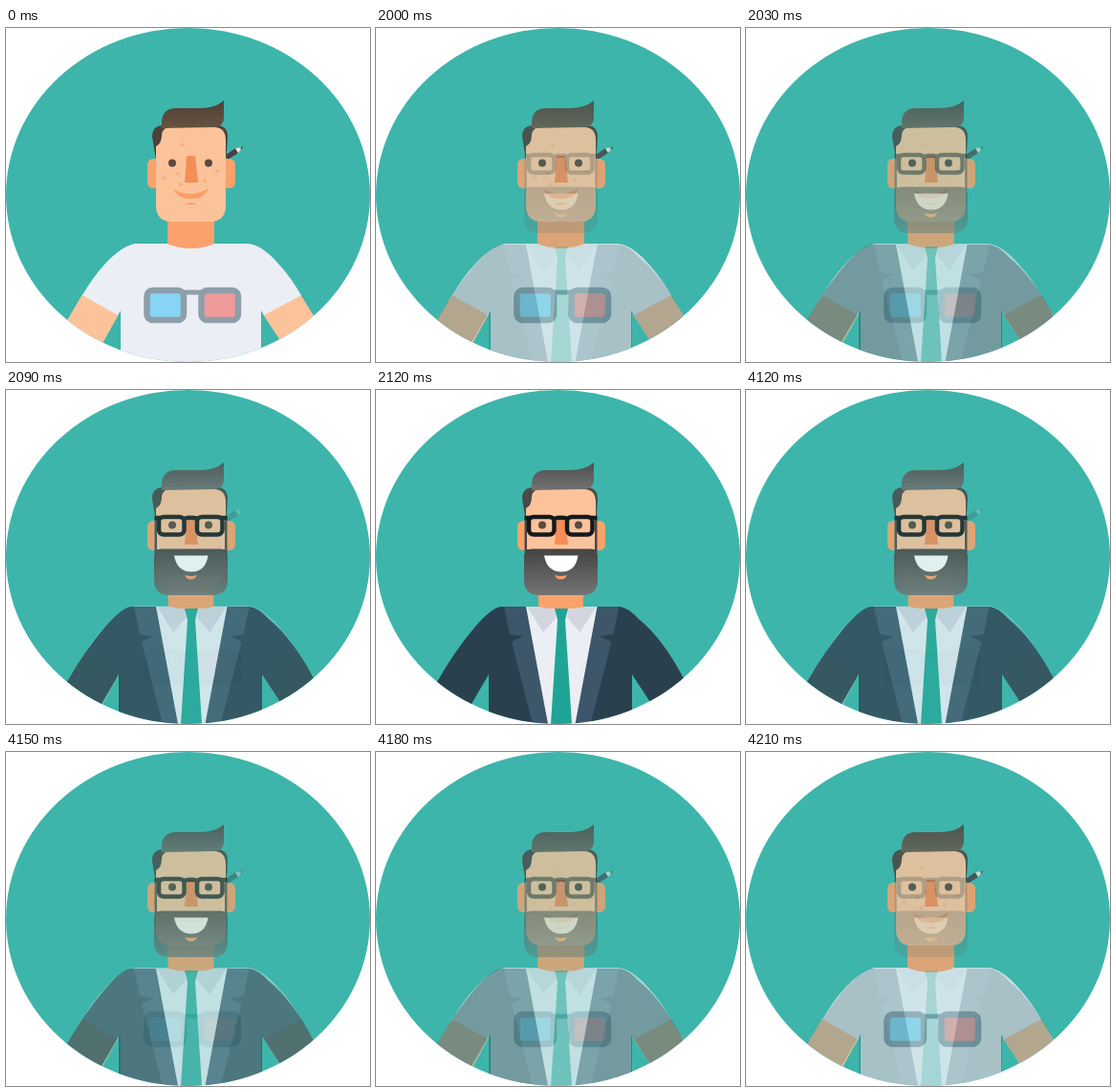
These frames come from a looping animation (381x350 px, 4.24 s). An HTML page:

```html
<!DOCTYPE html>
<html lang="en">
<head>
<meta charset="utf-8">
<title>Two looks</title>
<style>
  html, body { margin: 0; width: 100%; height: 100%; overflow: hidden; background: #fff; }
  svg { display: block; width: 381px; height: 350px; }
  #formal { opacity: 0; }
</style>
</head>
<body>
<svg viewBox="0 0 381 350">
  <defs>
    <clipPath id="stage"><ellipse cx="190.5" cy="175" rx="190.5" ry="175"/></clipPath>
    <linearGradient id="brown" x2="0" y2="1"><stop stop-color="#4f4038"/><stop offset="1" stop-color="#66533f"/></linearGradient>
    <linearGradient id="grey" x2="0" y2="1"><stop stop-color="#4f4f4f"/><stop offset="1" stop-color="#727272"/></linearGradient>
    <linearGradient id="beard" x2="0" y2="1"><stop stop-color="#434343"/><stop offset="1" stop-color="#747474"/></linearGradient>

    <path id="quiff" d="M163 105V98Q164 84 178 84H203Q219 84 228 76V93Q228 104 217 104Z"/>
    <path id="sides" d="M153 114Q153 102 165 102H220Q232 102 232 114L230.5 138H157Z"/>
    <g id="head">
      <rect x="148" y="137" width="16" height="31" rx="6" fill="#fba26c"/>
      <rect x="224" y="137" width="16" height="31" rx="6" fill="#fba26c"/>
      <path d="M157 124Q163 121 163 112Q164 104 172 104H218Q230 104 230 118V186Q230 203 213 203H174Q157 203 157 186Z" fill="#fcc39b"/>
      <path d="M189 134H198L201 162H187Z" fill="#f58d57"/>
      <g fill="#5b4a41"><circle cx="174" cy="141.5" r="4"/><circle cx="212" cy="141.5" r="4"/></g>
    </g>
  </defs>

  <g clip-path="url(#stage)">
    <rect width="381" height="350" fill="#3db5ab"/>

    <g id="casual">
      <path d="M80 279L118 300L98 336L50 330ZM308 279L269 300L290 332L340 330Z" fill="#fcc39b"/>
      <path d="M135 226H253Q268 227 286 248Q298 261 309 280L270 301L267 296V350H120V296L117 301L80 280Q91 261 103 248Q120 229 135 226Z" fill="#ebeef4"/>
      <path d="M169 190H218V226Q207 231 193.500 231T169 226Z" fill="#fba26c"/>
      <g stroke="#8e9eaa" stroke-width="6.500">
        <path d="M184 277H206" fill="none" stroke-width="5"/>
        <rect x="147.500" y="275" width="38.500" height="31" rx="6" fill="#86d5f5"/>
        <rect x="204.500" y="275" width="38.500" height="31" rx="6" fill="#ef9a98"/>
      </g>
      <use href="#sides" fill="#4e403a"/>
      <path d="M230 133L240 126L243 131L232 138Z" fill="#4a4045"/>
      <path d="M240 126L248 125L243 131Z" fill="#f2dfcd"/>
      <path d="M245.500 125.300L248.500 124.500L246 128Z" fill="#443c40"/>
      <use href="#head"/>
      <use href="#quiff" fill="url(#brown)"/>
      <g fill="#faae7b">
        <circle cx="184.500" cy="122.500" r="2"/><circle cx="166" cy="157.500" r="2"/>
        <circle cx="179.500" cy="152.500" r="1.700"/><circle cx="208" cy="160" r="2"/>
        <circle cx="183" cy="164" r="2"/><circle cx="221" cy="150" r="1.700"/>
      </g>
      <path d="M175 169Q193.500 179 212 168Q208 179 194 179T175 169ZM187 185Q194 181 200 185Z" fill="#fa9e68"/>
    </g>

    <g id="formal">
      <path d="M131 227H255Q264 228 275 240Q300 260 323 304L340 350H302L268 298V350H118V298L90 346L40 340L65 304Q82 274 103 249Q121 228 131 227Z" fill="#2b404e"/>
      <path d="M156 227H232L210 350H179Z" fill="#ebeef4"/>
      <path d="M170 195H217V229H170Z" fill="#fba26c"/>
      <g id="lapel">
        <path d="M134 227H157L180 350H164L142 264L154 258L140 256Z" fill="#3d566a"/>
        <path d="M158 227H170L188 230V239L175 254Z" fill="#d3d6e0"/>
      </g>
      <use href="#lapel" transform="matrix(-1 0 0 1 388.500 0)"/>
      <path d="M187 229H201L198 241L205 350H183L190 241Z" fill="#1fa596"/>
      <use href="#sides" fill="#4a4a4a"/>
      <use href="#head"/>
      <use href="#quiff" fill="url(#grey)"/>
      <path d="M155.500 135H158V167H229V135H231.500V170H155.500Z" fill="#484848"/>
      <path d="M155 173Q156 166.500 163 166.500H225Q231 166.500 232 173V199Q232 215 216 215H171Q155 215 155 199Z" fill="url(#beard)"/>
      <path d="M176 173.500H211.500Q209 190.500 194 190.500T176 173.500Z" fill="#fff"/>
      <path d="M187 194Q193.500 196 200 194Q198 198.500 193.500 198.500T187 194Z" fill="#fa9e68"/>
      <g fill="none" stroke="#15191b" stroke-width="4.500">
        <rect x="160" y="133" width="26.500" height="18.500" rx="5"/>
        <rect x="200" y="133" width="26.500" height="18.500" rx="5"/>
        <path d="M186 135Q193 132.500 201 135M155.500 134H162M225 134H231.500"/>
      </g>
    </g>
  </g>
</svg>
<script>
  const LOOP = 4240;
  // [time in ms, share of the formal look]
  const steps = [
    [0, 0], [2000, .2], [2030, .4], [2060, .6], [2090, .8],
    [2120, 1], [4120, .8], [4150, .6], [4180, .4], [4210, .2], [LOOP, .2]
  ];

  function fade(id, opacityOf) {
    const frames = steps.map(([time, share]) => ({
      offset: time / LOOP, opacity: opacityOf(share), easing: 'step-end'
    }));
    document.getElementById(id).animate(frames, { duration: LOOP, iterations: Infinity });
  }

  fade('casual', share => 1 - share);
  fade('formal', share => share);
</script>
</body>
</html>
```
